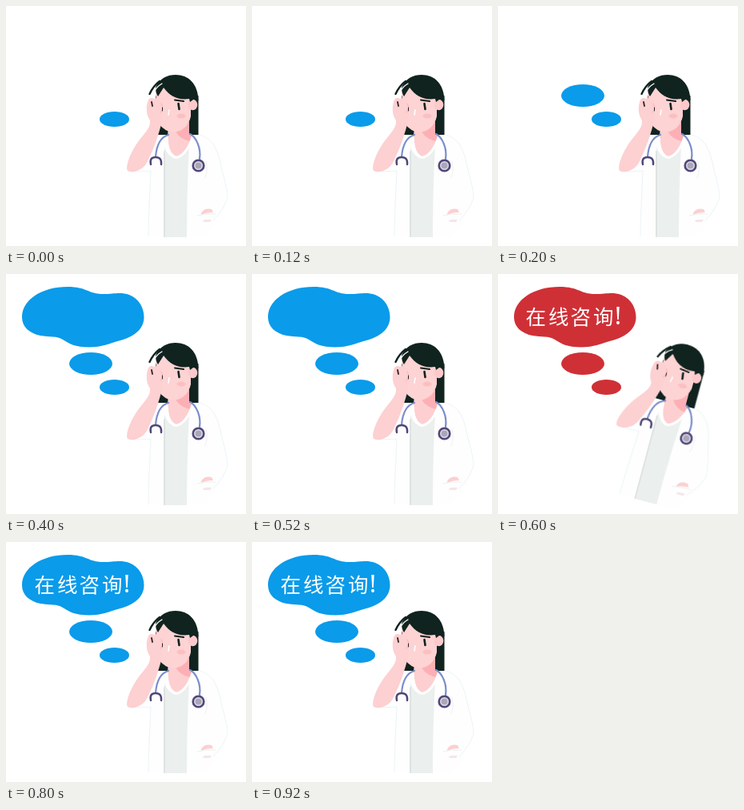
Recreate the animation shown at these times as an HTML page. Size 300 px wide and 300 px high, loop 1 s.

```html
<!DOCTYPE html>
<html lang="zh">
<head>
<meta charset="utf-8">
<title>在线咨询</title>
<style>
html, body { margin: 0; width: 100%; height: 100%; overflow: hidden; background: #fff; }
svg { display: block; width: 100vw; height: 100vh; }
.bubbles { fill: #0a9bea; animation: tint 1s step-end infinite; }
.mid { animation: mid 1s step-end infinite; }
.cloud { animation: cloud 1s step-end infinite; }
.label { fill: #fff; font: 400 25.5px "Noto Sans CJK SC", "Noto Sans CJK", sans-serif; animation: label 1s step-end infinite; }
.bang { font: 30px "Noto Serif", serif; }
.doctor { transform-origin: 213.5px 197px; animation: lean 1s step-end infinite; }
@keyframes tint { 0% { fill: #0a9bea; } 60% { fill: #cf3036; } 80% { fill: #0a9bea; } }
@keyframes mid { 0% { opacity: 0; } 20%, 100% { opacity: 1; } }
@keyframes cloud { 0% { opacity: 0; } 40%, 100% { opacity: 1; } }
@keyframes label {
  0% { opacity: 0; transform: none; }
  60% { opacity: 1; transform: translateX(-1px); }
  80%, 100% { opacity: 1; transform: none; }
}
@keyframes lean {
  0% { transform: none; }
  60% { transform: translate(-3.5px, -1px) rotate(15deg); }
  80%, 100% { transform: none; }
}
</style>
</head>
<body>
<svg viewBox="0 0 300 300">
  <g class="bubbles">
    <ellipse cx="135.500" cy="141.500" rx="18.500" ry="9.500"/>
    <ellipse class="mid" cx="106" cy="112" rx="27" ry="14"/>
    <path class="cloud" d="M20 54C20 32 45 16 77 16C101 16 103 25 121 25C136 25 143 22 154 26C167 31 172.500 43 172.500 54C172.500 70 158 79 143 83C128 87 121 91.500 104 91.500C86 91.500 79 87 71 82C64 77 54 79 43 77C29 74 20 66 20 54Z"/>
  </g>
  <g class="label">
    <text x="35.500 64 91.500 120" y="63">在线咨询</text>
    <text class="bang" x="146" y="63">!</text>
  </g>

  <g class="doctor" fill="none" stroke-linecap="round" stroke-linejoin="round">
    <!-- coat -->
    <path fill="#fefefe" d="M194 161C184 164 178 180 178 205V288H247C262 277 277 251 277 238C274 217 269 186 262 173C256 165 244 163 232 160Z"/>
    <path stroke="#eaf5f8" d="M164 207L181 206C180 233 178 263 178 288M242 161C262 166 266 186 270 205Q277 230 277 239Q273 254 259 268"/>
    <path stroke="#eef1f2" d="M250 194Q253 205 249 215"/>
    <!-- back hair -->
    <path fill="#10231f" d="M187 112H240.500V161H187Z"/>
    <!-- neck and shirt -->
    <path fill="#fdcfd0" d="M203 148H228V161L233 163Q226 186 213 188Q203 184 202 164Z"/>
    <path fill="#fcb0b5" d="M207 157Q220 155 229 144V161L233 163L231 169Q218 167 212 157Z"/>
    <path fill="#ebefee" d="M198 176Q203 190 213 190Q224 188 229 174Q226 230 226 289H197Z"/>
    <path stroke="#dfe3e3" stroke-width="2" d="M198 182V288"/>
    <path stroke="#fff" stroke-width="3" d="M201 164Q202 188 213 189.500Q226 186 233 164"/>
    <!-- face -->
    <path fill="#fdd3d3" d="M187 107Q191 95 204 95Q229 98 231 116V138Q227 155 210 158Q199 158 190 146Z"/>
    <ellipse cx="233.500" cy="123.500" rx="5.800" ry="6.800" fill="#fdc9cb"/>
    <ellipse cx="219" cy="137.500" rx="5.500" ry="3" fill="#fbbfc2"/>
    <path stroke="#17201f" stroke-width="2" d="M211 117.500L222 119"/>
    <path stroke="#17201f" stroke-width="2.600" d="M215.500 122L216.500 129"/>
    <path stroke="#fff" stroke-width="1.600" d="M204 130L203 136"/>
    <!-- fringe -->
    <path fill="#10231f" d="M187 102C192 90 202 86 212 86C228 86 240 97 240.500 118Q238 116.500 234 117L230 120L229 116C215 118 205 113 197 102L190 113Q187 109 187 102Z"/>
    <path stroke="#10231f" stroke-width="2.400" d="M179.500 110Q184 100 192 94"/>
    <path stroke="#fff" stroke-width="1.300" d="M184 109Q188 101 195 97"/>
    <!-- raised arm -->
    <path fill="#fdd0d1" d="M177 120C178 115 182 114 185 116Q188 113 190 118Q193 116 194 122Q199 123 196 130L194 148C190 163 185 178 177 194C172 205 159 210 152 206C148 200 158 178 168 166C175 157 181 151 180 143C175 136 175 127 177 120Z"/>
    <path stroke="#f8b4b8" d="M194 122Q198 128 193 133"/>
    <path stroke="#2b2528" stroke-width="1.800" d="M182 120L183 125"/>
    <path stroke="#2b2528" d="M195.500 127V131"/>
    <!-- stethoscope -->
    <path stroke="#7b8dcb" stroke-width="2.200" d="M203 161C193 164 188 175 187 189M230 160C238 164 244 178 242 191"/>
    <path stroke="#4e4775" stroke-width="2.400" d="M181 198Q179 189 187 189Q195 189 194 198"/>
    <circle cx="240.500" cy="199.500" r="6.800" fill="#aaa6b8" stroke="#51477a" stroke-width="2.600"/>
    <circle cx="240.500" cy="199.500" r="4.600" stroke="#e4e2ec" stroke-width="1.200"/>
    <!-- pocket -->
    <path fill="#fdcfd0" d="M244 259Q248 252 257 254L259 258Q250 258 244 261Z"/>
    <path fill="#f5e6e7" d="M246 268Q251 266 257 267L255 270H247Z"/>
    <path stroke="#edf1f1" d="M239 262Q250 259 262 260"/>
  </g>
</svg>
</body>
</html>
```
